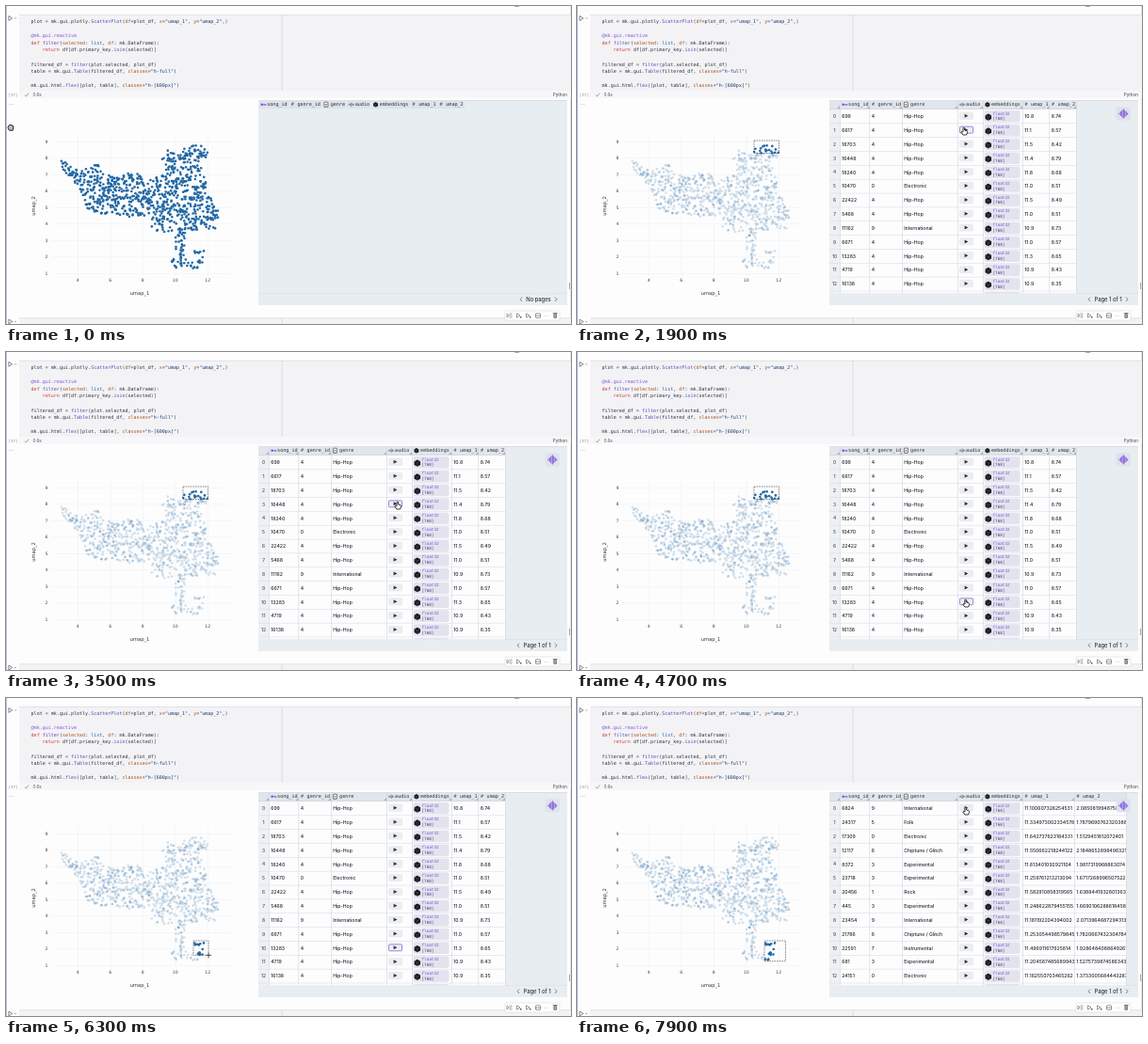
These frames come from a looping animation (600x338 px, 8 s). An HTML page with a canvas:

```html
<!DOCTYPE html>
<html lang="en">
<head>
<meta charset="utf-8">
<title>Scatter plot selection</title>
<style>
html, body { margin: 0; width: 100%; height: 100%; overflow: hidden; background: #fdfdfd; }
canvas { display: block; width: 600px; height: 338px; }
</style>
</head>
<body>
<canvas id="stage"></canvas>
<script>
const LOOP = 8000;
const MONO = '"DejaVu Sans Mono", monospace';
const SANS = 'Inter, sans-serif';
const PLOT = '"DejaVu Sans", sans-serif';
const BLUE = '#2268a4', INK = '#22262d', PURPLE = '#7653d8', RULE = '#cfd5dd';
const canvas = document.getElementById('stage');
const scale = window.devicePixelRatio || 1;
canvas.width = 600 * scale;
canvas.height = 338 * scale;
const g = canvas.getContext('2d');

function rect(x, y, w, h, fill) {
  g.fillStyle = fill;
  g.fillRect(x, y, w, h);
}
function box(x, y, w, h, r, fill, stroke, width = 0.7) {
  g.beginPath();
  g.roundRect(x, y, w, h, r);
  if (fill) { g.fillStyle = fill; g.fill(); }
  if (stroke) { g.strokeStyle = stroke; g.lineWidth = width; g.stroke(); }
}
function text(s, x, y, font, color = INK, align = 'left') {
  g.font = font;
  g.fillStyle = color;
  g.textAlign = align;
  g.textBaseline = 'middle';
  g.fillText(s, x, y);
}
function path(d, x, y, fill, stroke, width = 0.7) {
  const p = new Path2D(d);
  g.save();
  g.translate(x, y);
  if (fill) { g.fillStyle = fill; g.fill(p); }
  if (stroke) { g.strokeStyle = stroke; g.lineWidth = width; g.stroke(p); }
  g.restore();
}
function randomFrom(seed) {
  return () => (seed = (seed * 16807) % 2147483647) / 2147483647;
}

// Code cell
const code = [
  'plot = mk.gui.plotly.ScatterPlot(df=plot_df, x="umap_1", y="umap_2",)', '',
  '@mk.gui.reactive',
  'def filter(selected: list, df: mk.DataFrame):',
  '    return df[df.primary_key.isin(selected)]', '',
  'filtered_df = filter(plot.selected, plot_df)',
  'table = mk.gui.Table(filtered_df, classes="h-full")', '',
  'mk.gui.html.flex([plot, table], classes="h-[600px]")'
];
const tokens = [
  [/"[^"]*"/y, '#14386e'],
  [/@[\w.]+/y, '#8250df'],
  [/(def|return)\b/y, '#cf3a3a'],
  [/list\b/y, '#2460b0'],
  [/\w+(?==|: )/y, '#a8501c'],
  [/\w+(?=\()/y, '#5a48b8'],
  [/\w+/y, '#2a3040'],
  [/./y, '#3c424c']
];
function drawCode() {
  code.forEach((line, row) => {
    for (let i = 0; i < line.length;) {
      for (const [re, color] of tokens) {
        re.lastIndex = i;
        const match = re.exec(line);
        if (!match) continue;
        text(match[0], 26.6 + i * 3.028, 16.7 + 7.6 * row, `5.03px ${MONO}`, color);
        i += match[0].length;
        break;
      }
    }
  });
}

function drawPage() {
  rect(0, 0, 600, 338, '#fdfdfd');
  rect(0, 0, 1, 338, '#b4c4dc');
  rect(599, 0, 1, 338, '#e4e6ea');
  rect(598, 294, 1, 7, '#aaa');
  rect(540, 0, 5, 0.8, '#999');
  for (const [y, h] of [[9, 81], [331.5, 7]]) {
    rect(14, y, 586, h, '#f3f3f5');
    rect(14, y, 586, 0.7, '#d9dbe0');
    rect(292.7, y, 0.8, h, '#d5d7dc');
    path('M-1.6-2.4L2.2 0L-1.6 2.4Z', 4.5, y + 4, null, '#555');
    path('M-1-.6L0 .5L1-.6', 10, y + 4, null, '#777', 0.6);
  }
  rect(14, 90, 586, 8, '#f7f7f9');
  drawCode();
  text('[37]', 2.5, 95, `4.2px ${MONO}`, '#8a8a8a');
  path('M0 0L1.4 1.5L4-2', 20, 94.6, null, '#4a9360');
  text('0.6s', 28.5, 94.5, `4.6px ${SANS}`, '#555');
  text('Python', 596, 94.5, `4.6px ${SANS}`, '#444', 'right');
  text('…', 3, 103, `6px ${SANS}`, '#666');

  box(530, 324, 58, 10, 1, '#fff', '#dcdfe4');
  for (const y of [-2, 0, 2]) rect(534.5, 328.7 + y, 3, 0.6, '#666');
  path('M0-2L2.2 0L0 2Z', 532, 329, null, '#666', 0.6);
  for (const x of [544, 554]) {
    path('M-1.5-2.2L2 0L-1.5 2.2Z', x, 329, null, '#555', 0.6);
    rect(x + 2, 330, 1.4, 1.6, '#555');
  }
  box(562.5, 326.8, 5, 4.6, 0.5, null, '#555', 0.6);
  rect(562.5, 328.8, 5, 0.6, '#555');
  text('…', 574, 328, `5px ${SANS}`, '#555', 'center');
  box(581.8, 327.4, 2.8, 4, 0.4, '#aaa', '#444', 0.6);
  rect(580.8, 326.2, 4.8, 0.7, '#444');
}

// Scatter plot: random dots inside one outline
const outline = new Path2D(`M55 161L78 174L98 167L104 180L122 177L140 178L148 187L170 178
  L163 154L189 152L192 145L210 147L217 162L203 162L213 182L212 200L222 207L228 228L222 238
  L193 238L190 262L192 272L203 272L207 264L199 263L200 258L213 258L212 272L203 279L172 278
  L180 262V242L152 239L155 222L120 225L86 217L78 192L66 185Z`);
const rnd = randomFrom(4711);
const points = [];
while (points.length < 950) {
  const p = [50 + 180 * rnd(), 144 + 137 * rnd()];
  if (g.isPointInPath(outline, ...p)) points.push(p);
}

function selection(t, [x, y]) {
  if (t < 550) return null;
  if (t < 5950) return [188, 143, Math.min(x, 214.5), Math.min(y, 156.5)].map((v, i) =>
    t < 1000 ? v : [188, 143, 214.5, 156.5][i]);
  return t < 6550 ? [199, 258, x, y] : [199, 258, 221.5, 279.7];
}
function drawPlot(sel) {
  const small = `4.6px ${PLOT}`, label = `5.2px ${PLOT}`;
  for (let v = 4; v <= 12; v += 2) {
    const x = 7.2 + 17.25 * v;
    rect(x, 136, 0.6, 151, '#eff2f7');
    text(v, x, 291.8, small, '#444', 'center');
  }
  for (let v = 1; v <= 9; v++) {
    const y = 301.5 - 17.5 * v;
    rect(48, y, 191, 0.6, '#eff2f7');
    text(v, 44.5, y + 0.3, small, '#444', 'right');
  }
  text('umap_1', 142, 305.3, label, '#333', 'center');
  g.save();
  g.translate(29.5, 212.5);
  g.rotate(-Math.PI / 2);
  text('umap_2', 0, 0, label, '#333', 'center');
  g.restore();

  g.fillStyle = BLUE;
  for (const [x, y] of points) {
    const inside = !sel || (x > sel[0] && x < sel[2] && y > sel[1] && y < sel[3]);
    g.globalAlpha = inside ? 1 : 0.2;
    g.beginPath();
    g.arc(x, y, 1.3, 0, 7);
    g.fill();
  }
  g.globalAlpha = 1;
  if (sel) {
    g.setLineDash([1.6, 1]);
    g.strokeStyle = '#555';
    g.lineWidth = 0.7;
    g.strokeRect(sel[0], sel[1], sel[2] - sel[0], sel[3] - sel[1]);
    g.setLineDash([]);
  }
}
function drawTip() {
  path('M0 0L5-2V-3.8H54V3.8H5V2Z', 204, 258.4, BLUE, '#fff', 0.4);
  text('(11.3928, 2.469751)', 211, 258.5, `4.4px ${PLOT}`, '#fff');
}

// Table
const genres = ['Electronic', 'Rock', '', 'Experimental', 'Hip-Hop', 'Folk',
  'Chiptune / Glitch', 'Instrumental', '', 'International'];
function makeTable(ids, kinds, low, span, digits, width) {
  const random = randomFrom(97);
  const rows = ids.split(' ').map((id, i) => [id, kinds[i], genres[kinds[i]],
    ...low.map((v, k) => (v + span[k] * random()).toFixed(digits[k]))]);
  return { rows, width };
}
const topTable = makeTable('699 6617 18703 16448 18240 10470 22422 5468 11162 6671 13283 4719 16138',
  '4444404494444', [10.8, 8.28], [1.1, 0.6], [1, 2], 28.5);
const lowTable = makeTable('6824 24317 17309 12117 8372 23718 20456 445 23454 21786 22591 681 24151',
  '9506331396730', [11.1, 1.25], [0.8, 1.1], [15, 16], 55);

function cube(x, y, r) {
  path(`M0 ${-r}L${r * .9} ${-r / 2}V${r / 2}L0 ${r}L${-r * .9} ${r / 2}V${-r / 2}Z`, x, y, '#15171c');
  path(`M${-r * .8} ${-r / 2}L0 0L${r * .8} ${-r / 2}M0 0V${r}`, x, y, null, '#777', 0.4);
}
const names = ['song_id', 'genre_id', 'genre', 'audio', 'embeddings', 'umap_1', 'umap_2'];
const icons = {
  song_id(x, y) {
    path('M2 0H6M4.8 0V1.2', x, y, null, PURPLE, 0.9);
    box(x, y - 1.2, 2.4, 2.4, 1.2, PURPLE);
  },
  genre(x, y) {
    box(x, y - 2.6, 4, 5.2, 0.4, '#fff', '#444');
    path('M1-.3H3M1 1.1H3', x, y, null, '#444', 0.6);
  },
  audio: (x, y) => path('M0-.6V.6M1.4-1.2V1.2M2.8-2V2M4.2-1.2V1.2M5.4-.6V.6', x, y, null, '#555'),
  embeddings: (x, y) => cube(x + 2.5, y, 2.7),
  number: (x, y) => text('#', x, y, `5px ${MONO}`, '#444')
};
function heading(name, x) {
  (icons[name] || icons.number)(x, 104.8);
  text(name, x + 6.7, 104.6, `5.1px ${MONO}`, '#2c3038');
}
function footer(label, left) {
  text(label, (left + 584) / 2, 311.8, `500 5.8px ${SANS}`, '#30343c', 'center');
  path('M1-2.2L-1 0L1 2.2', left, 311.8, null, '#666', 0.8);
  path('M-1-2.2L1 0L-1 2.2', 584, 311.8, null, '#666', 0.8);
}
function embedding(y) {
  box(432.5, y - 6.3, 38, 12.6, 2, '#e3e3ee');
  cube(436.8, y + 0.8, 3.6);
  text('float32', 441.5, y - 2.9, `4.3px ${MONO}`, PURPLE);
  text('[768]', 441.5, y + 2.9, `4.3px ${MONO}`, '#4b3a80');
}
function drawPanel() {
  rect(268, 100, 328, 218, '#e8edf1');
  rect(268, 100, 328, 0.6, RULE);
  rect(268, 305.3, 328, 0.6, '#d9dfe5');
}
function drawEmpty() {
  let x = 270.5;
  for (const name of names) {
    const width = 10.7 + 3.07 * name.length;
    rect(x - 2, 100.6, width - 0.7, 8.6, '#dde3ea');
    heading(name, x);
    x += width;
  }
  footer('No pages', 547);
}
function drawTable({ rows, width }, focus) {
  const edges = [279];
  for (const w of [31.5, 34.5, 59, 27, 42, width, width]) edges.push(edges.at(-1) + w);
  const end = edges.at(-1), cell = `500 5.1px ${SANS}`;
  rect(268, 100.6, end - 268, 9, '#e1e6ec');
  rect(268, 109.5, end - 268, 196, '#fdfdfe');
  rect(268, 109.5, 11, 196, '#edf0f4');
  names.forEach((name, i) => heading(name, edges[i] + 2.4));
  g.save();
  g.beginPath();
  g.rect(268, 109.5, end - 268, 196);
  g.clip();
  for (let i = 0; i <= rows.length; i++) {
    const y = 117.3 + 14.85 * i;
    rect(268, y + 7.2, end - 268, 0.6, '#d9dee5');
    embedding(y);
    if (i === rows.length) break;
    text(i, 273.5, y + 0.3, `500 4.8px ${SANS}`, '#454b55', 'center');
    rows[i].forEach((value, k) =>
      text(value, edges[k < 3 ? k : k + 2] + 2.2, y + 0.3, cell));
    box(406.5, y - 4, 14, 7, 1, '#eceef2', i === focus ? PURPLE : '#e2e5ea');
    path('M-1.6-2L2.2 0L-1.6 2Z', 413.2, y - 0.5, '#333');
  }
  g.restore();
  for (const x of edges) {
    rect(x, 100, 0.6, 205.5, RULE);
    path('M0 0V-3L-3 0Z', x, 109, '#aab2bd');
  }
  rect(268, 109.2, end - 268, 0.6, '#c3cad3');
  footer('Page 1 of 1', 544);

  box(572.5, 107, 15.5, 14.5, 3, '#dfe2ee');
  for (let i = -3; i <= 3; i++) {
    const h = 5.2 - 1.4 * Math.abs(i);
    box(579.8 + i * 1.45, 114.4 - h, 1, h * 2, 0.5, PURPLE);
  }
}

// Pointer moves: start time, end time, x, y
const moves = [
  [100, 500, 188, 143], [550, 980, 215, 157], [1150, 1750, 411, 133],
  [2500, 3100, 416, 163], [3700, 4500, 413, 267], [5000, 5500, 215, 259],
  [5750, 5900, 199, 258], [5950, 6500, 222, 280], [6600, 7000, 339, 229],
  [7250, 7750, 413, 120]
];
function pointerAt(t) {
  let x = 5, y = 129;
  for (const [start, end, toX, toY] of moves) {
    const k = Math.min(1, Math.max(0, (t - start) / (end - start)));
    const ease = k * k * (3 - 2 * k);
    x += (toX - x) * ease;
    y += (toY - y) * ease;
  }
  return [x, y];
}
function drawPointer([x, y]) {
  if (x > 40 && x < 245) {
    path('M-3 0H3M0-3V3', x, y, null, '#fff', 1.6);
    path('M-3 0H3M0-3V3', x, y, null, '#222', 0.8);
  } else if (x < 10) {
    path('M-2.4-1.6Q-1-3.4 .4-2.4Q2.6-2.8 3 0L2.2 3.2H-1.4L-3 .6Z', x, y, '#bbb', '#222', 1);
  } else if (x > 404 && x < 424) {
    path('M-1-3.5Q0-4.5 .6-3.4V-1L3-.3Q3.8 0 3.4 1.8L2.6 4H-1.2L-3.2 1Q-2.7 0-1 1Z', x, y, '#fff', '#222', 0.9);
  } else {
    path('M0-3V4L1.6 2.6L2.7 5L4 4.4L2.9 2.1H5Z', x, y, '#111', '#fff', 0.5);
  }
}

function focusAt(t) {
  if (t < 1850) return -1;
  return t < 3250 ? 1 : t < 4650 ? 3 : 10;
}
function draw(now) {
  const t = Math.floor((now % LOOP) / 100) * 100;
  const pointer = pointerAt(t);
  g.setTransform(scale, 0, 0, scale, 0, 0);
  drawPage();
  drawPlot(selection(t, pointer));
  drawPanel();
  if (t < 1400) drawEmpty();
  else if (t < 7300) drawTable(topTable, focusAt(t));
  else drawTable(lowTable, -1);
  if (t >= 5500 && t < 5800) drawTip();
  drawPointer(pointer);
  requestAnimationFrame(draw);
}
requestAnimationFrame(draw);
</script>
</body>
</html>
```
